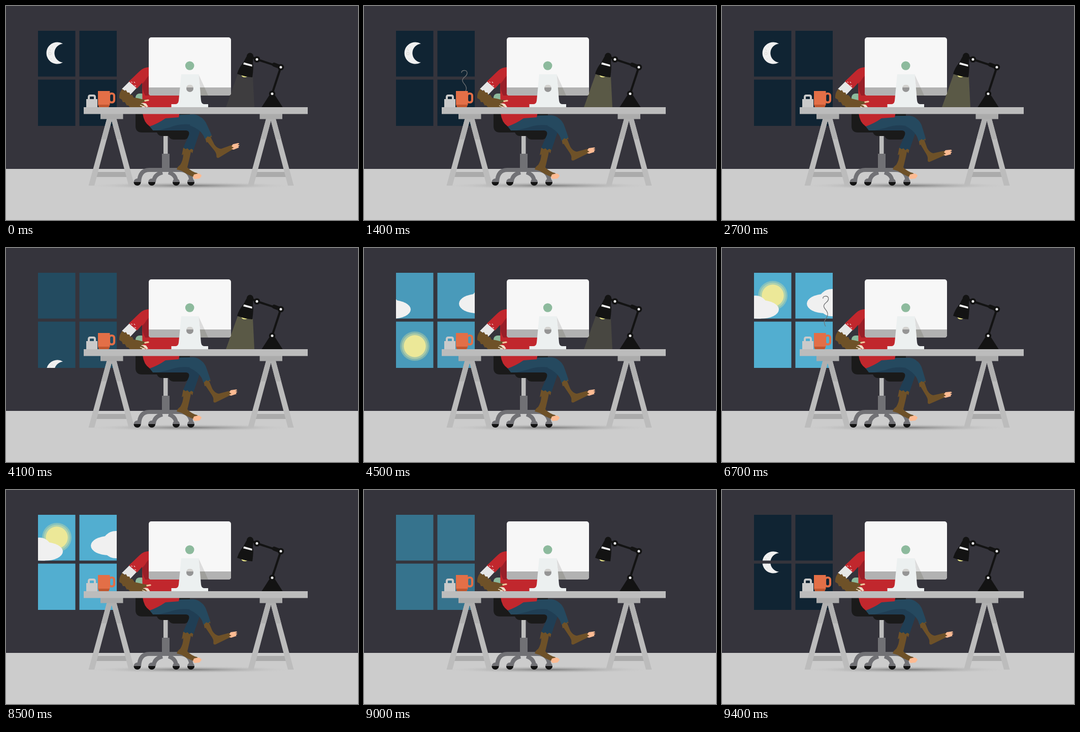
Animation of 693x423 px, one loop 9500 ms. Source, as an HTML page:

```html
<!DOCTYPE html>
<html lang="en">
<head>
<meta charset="utf-8">
<title>Night shift</title>
<style>
  html, body { margin: 0; width: 100%; height: 100%; overflow: hidden; background: #35343c; }
  svg { display: block; width: 100vw; height: 100vh; }
</style>
</head>
<body>
<svg viewBox="0 0 693 423">
  <defs>
    <clipPath id="panes">
      <path d="M63 49H136.500V139.500H63ZM144.500 49H218V139.500H144.500ZM63 145.500H136.500V237H63ZM144.500 145.500H218V237H144.500Z"/>
    </clipPath>
    <clipPath id="aboveMug"><rect x="150" y="49" width="100" height="120"/></clipPath>
    <radialGradient id="shade">
      <stop offset="0" stop-color="#6c6c6c" stop-opacity=".85"/>
      <stop offset=".45" stop-color="#8a8a8a" stop-opacity=".4"/>
      <stop offset="1" stop-color="#ccc" stop-opacity="0"/>
    </radialGradient>
    <g id="trestle">
      <rect x="174" y="328" width="70" height="10" fill="#ababab"/>
      <path d="M198.500 223H209L174 355H162.500ZM207 223H217.500L253 355H241.500Z" fill="#bcbcbc"/>
      <path d="M198.500 223H209L198.400 263.500H187.500ZM207 223H217.500L228.400 263.500H217.600Z" fill="#b0b0b0"/>
      <rect x="186" y="213" width="44.500" height="10.500" fill="#ababab"/>
    </g>
    <g id="caster">
      <circle r="7" fill="#717175"/>
      <path d="M-7 0A7 7 0 0 0 7 0Z" fill="#131313"/>
    </g>
    <g id="joint">
      <circle r="6.300" fill="#131313"/>
      <circle r="2.500" fill="#f4f4f4"/>
    </g>
  </defs>

  <rect width="693" height="423" fill="#35343c"/>
  <rect y="322" width="693" height="101" fill="#ccc"/>

  <g clip-path="url(#panes)">
    <rect id="sky" x="63" y="49" width="155" height="188"/>
    <g id="moon">
      <path d="M112 74.500A21.500 21.500 0 1 0 112 111.500A18.600 18.600 0 0 1 112 74.500Z" fill="#f0f0f0"/>
      <g fill="none" stroke="#d9d7d2" stroke-width="1">
        <circle cx="86.500" cy="94" r="2.600"/>
        <path d="M84 85q4 0 3 4M90 82l2-2M88 104l2 1"/>
      </g>
    </g>
    <g id="sun" fill="#ece898">
      <circle cx="100" cy="94" r="29" opacity=".32"/>
      <circle cx="100" cy="94" r="25.500" opacity=".4"/>
      <circle cx="100" cy="94" r="21.700"/>
    </g>
    <g id="cloudL" fill="#f0f0f0">
      <circle cx="66" cy="118" r="24"/>
      <ellipse cx="76" cy="121.500" rx="36" ry="18.500"/>
    </g>
    <g id="cloudR" fill="#f0f0f0">
      <circle cx="216" cy="108" r="27"/>
      <ellipse cx="202" cy="110" rx="35" ry="19"/>
    </g>
  </g>

  <ellipse cx="362" cy="355" rx="205" ry="7" fill="url(#shade)"/>
  <use href="#trestle"/>
  <use href="#trestle" x="313.500"/>

  <!-- chair -->
  <rect x="255" y="173" width="20" height="28" rx="8" fill="#8dba9d"/>
  <path d="M255 205V237Q255 250 268 250H297Q300 257 307 257H320Q323 264 330 264H352Q362 262 362 246V205Z" fill="#1a1a1a"/>
  <rect x="310" y="257" width="8.500" height="36" fill="#bcbcbc"/>
  <rect x="307" y="292" width="15" height="32" fill="#717175"/>
  <g fill="none" stroke="#717175" stroke-width="8">
    <path d="M262 348Q263 324 282 324H342Q364 324 365 348"/>
    <path d="M291 348Q291 333 308 329M335 348Q335 333 320 329"/>
  </g>
  <use href="#caster" x="258.500" y="348"/>
  <use href="#caster" x="287" y="348"/>
  <use href="#caster" x="335" y="348"/>
  <use href="#caster" x="364" y="348"/>

  <!-- planted leg -->
  <path d="M349 280L369 283L367 291L364 288L362 298L357 319Q366 328 376 330L380 334L371 339Q358 334 346 326L336 323Q338 317 343 314Q349 304 349 293L346 295Z" fill="#6e5128"/>
  <path d="M370 333L379 331Q385 333 385 336L381 341L371 342L368 338Z" fill="#fdbb93"/>
  <path d="M283 238L290 246H355Q362 247 360 255L349 280L354 283L357 281L361 285L365 282L369 285L381 250Q384 234 368 230L300 226Z" fill="#203e54"/>

  <!-- crossed leg -->
  <g id="leg">
    <g id="shin">
      <path d="M387 262L400 260L401 266L398 264L404 281Q409 290 416 291L434 287L441 286L441 294L434 297L409 308Q404 309 405 303Q406 298 400 289L391 274L389 275Z" fill="#6e5128"/>
      <path d="M437 289L440 285L451 284L453 286L449 287L453 289L450 291L451 293L440 296L436 294L441 292Z" fill="#fdbb93"/>
      <path d="M361 237Q366 219 381 222Q391 226 395 242L401 262L396 265L393 263L387 268L385 261Q380 247 361 237Z" fill="#25495f"/>
    </g>
    <path d="M283 238C302 225 320 217 346 217H370Q380 218 386 226L378 246Q370 236 354 236Q338 235 322 241L300 246H289Z" fill="#25495f"/>
  </g>

  <!-- torso and sleeve -->
  <path d="M290 121Q273 120 264 129L268 152L269 212Q271 230 283 238Q300 232 314 222L340 220L342 210V150L330 121Z" fill="#c1272d"/>
  <path d="M268 154Q278 145 281 130V177H274Q268 166 268 154Z" fill="#981f28"/>
  <path d="M243 149L228 164Q236 168 244 176L258 161Z" fill="#e6e6e6"/>
  <path d="M285 121Q272 120 264 128L242 149L258 163L268 152L281 138Z" fill="#c1272d"/>
  <path d="M246 150l3 1M252 150l2 2M253 157l3 1" stroke="#f3d9d9" stroke-width="1.200"/>

  <!-- monitor -->
  <rect x="281" y="62" width="162" height="115" rx="5" fill="#f7f7f7"/>
  <path d="M281 161H443V172Q443 177 438 177H286Q281 177 281 172Z" fill="#b2b2b2"/>
  <path d="M379 135L391 161H382Z" fill="#dcdcdc"/>
  <path d="M382 161H391L398 177H383Z" fill="#9f9f9b"/>
  <path d="M345 135H379.500L384 187Q385 194 390 194H398V200.500H325.500V194H334Q339 194 340 187Z" fill="#ecf0f0"/>
  <circle cx="362" cy="163" r="7" fill="#959595"/>
  <path d="M355.200 161A7 7 0 0 1 368.800 161Z" fill="#d2d1ce"/>
  <circle cx="361.700" cy="118" r="8.800" fill="#8dba9d"/>

  <!-- lamp -->
  <path id="beam" d="M456 135L486 140L489 200H433Z" fill="#ede870"/>
  <ellipse cx="470" cy="136.500" rx="6.500" ry="4.500" fill="#e9e58a"/>
  <path d="M474 99A6.500 6.500 0 0 1 487 99L486 112Q488 120 485 141Q470 140 455 134Q459 121 467 112Z" fill="#131313"/>
  <path d="M468.500 111.500L484.500 116V119.700L467 115.300Z" fill="#f4f4f4"/>
  <path d="M484 101L494 105.500L541 121L524 173" fill="none" stroke="#131313" stroke-width="4.200"/>
  <path d="M528 116L541 121" stroke="#131313" stroke-width="8" stroke-linecap="round"/>
  <path d="M518 177H530L545 200.500H503Z" fill="#131313"/>
  <use href="#joint" x="494" y="105.500"/>
  <use href="#joint" x="541" y="121"/>
  <use href="#joint" x="524" y="173.500"/>

  <!-- things on the desk -->
  <g clip-path="url(#aboveMug)">
    <path id="steam" d="M199 100C197 95 208 93 209.500 99C211 108 199 108 200.500 116C202 122 209 124 208 132C207 140 200 142 201.500 148Q202 152 204 155" fill="none" stroke="#727476" stroke-width="1.300"/>
  </g>
  <path d="M158 184H180V200H158Z" fill="#cacaca"/>
  <path d="M163 185V180Q163 177 166 177H172Q175 177 175 180V185" fill="none" stroke="#cacaca" stroke-width="4"/>
  <rect x="203" y="173" width="10" height="17.500" rx="4.500" fill="none" stroke="#e36f47" stroke-width="4.200"/>
  <path d="M181 168H204.500V195L202 200H183L181 195Z" fill="#e36f47"/>
  <path d="M181.500 195H204L202 200H183Z" fill="#c0562f"/>

  <path id="arm" fill="#6e5128"/>
  <g id="claws">
    <path d="M272 186L280 184.500Q283 186 281 187.500L273 189Z" fill="#f1c69d"/>
    <path d="M263 194Q270 190 276 193L280 199L276 200L272 196L274 200H268Z" fill="#f1dfc8"/>
    <path d="M262 192L270 194L273 198L263 200Z" fill="#6e5128"/>
    <path d="M264 196L272 199" stroke="#f1dfc8" stroke-width="1.400"/>
  </g>

  <rect x="153" y="200" width="441" height="13.500" fill="#bcbcbc"/>
</svg>

<script>
const LOOP = 9500, HALF = LOOP / 2, TICK = 100;
const NIGHT = [16, 36, 51], DAY = [82, 174, 208];
const STEP = HALF / 24;                  // foot beat
const TAP = [0.35, 0, 0.35, 1];          // foot lift on each beat
const DROP = 175;                        // travel below the sill

const $ = id => document.getElementById(id);
const ramp = (t, a, b) => Math.min(1, Math.max(0, (t - a) / (b - a)));
const move = (id, x, y) => $(id).setAttribute('transform', `translate(${x} ${y})`);

// Day begins at 3700 and ends 4800 later, with the same timing.
const DUSK = 4800;
const sinkAt = t => DROP * ramp(t, 3700, 4167);
const riseAt = t => DROP * (1 - ramp(t, 4350, 4700));

function drawSky(t) {
  const dusk = t - DUSK;
  const light = ramp(t, 3900, 4600) - ramp(dusk, 3900, 4600);
  const rgb = NIGHT.map((c, i) => Math.round(c + (DAY[i] - c) * light));
  $('sky').setAttribute('fill', `rgb(${rgb})`);

  move('moon', 0, t < 6000 ? sinkAt(t) : riseAt(dusk));
  move('sun', 0, t < 6000 ? riseAt(t) : sinkAt(dusk));

  const away = 60 * (1 - ramp(t, 4300, 4600) + ramp(dusk, 3900, 4200));
  move('cloudL', -away, 0);
  move('cloudR', away, 0);

  const late = (t + 1000) % LOOP;
  const lamp = t < 4000 || t > 9000 ? ramp(late, 950, 1150) : 1 - ramp(t, 4400, 4600);
  $('beam').setAttribute('opacity', 0.2 * lamp);
}

function drawSteam(h) {
  const s = h - 700;
  const k = ramp(h, 700, 2650);
  move('steam', 0.012 * (s - 1250), -0.0584 * (s - 1250));
  $('steam').setAttribute('opacity', Math.min(1, 5 * k, 3 * (1 - k)));
}

function drawLeg(h) {
  const beat = Math.floor((h - 110) / STEP) + 4;
  const lift = TAP[beat % 4];
  $('leg').setAttribute('transform', `rotate(${-2 * lift} 290 235)`);
  $('shin').setAttribute('transform', `rotate(${-5.5 * lift} 376 228)`);
}

function typing(h) {
  const start = h < 2850 ? 750 : 3075;
  const end = h < 2850 ? 2850 : 3975;
  return h < start || h > end ? 0 : Math.sin(Math.PI * (h - start) / 300) ** 2;
}

function drawArm(h) {
  const d = typing(h), x = 8 * d, y = 4 * d;
  const p = (a, b, f = 1) => `${a + x * f} ${b + y * f} `;
  $('arm').setAttribute('d',
    'M229 164L233 168L236 166L239 171L243 171L245 176L249 176L' +
    p(251, 181, 0.5) + 'Q' + p(260, 182) + p(267, 184) + 'L' + p(276, 185) +
    p(276, 188) + p(268, 191) + p(272, 194) +
    `L${268 + x} 200H244L240 196L238 197L234 190L230 190L228 185L223 182Q222 172 229 164Z`);
  move('claws', x, Math.min(y, 3) * 0.9);
}

function draw(now) {
  const t = Math.floor(now % LOOP / TICK) * TICK;
  const h = t % HALF;
  drawSky(t);
  drawSteam(h);
  drawLeg(h);
  drawArm(h);
}

const begin = performance.now();
function frame() {
  draw(performance.now() - begin);
  requestAnimationFrame(frame);
}
frame();
</script>
</body>
</html>
```
